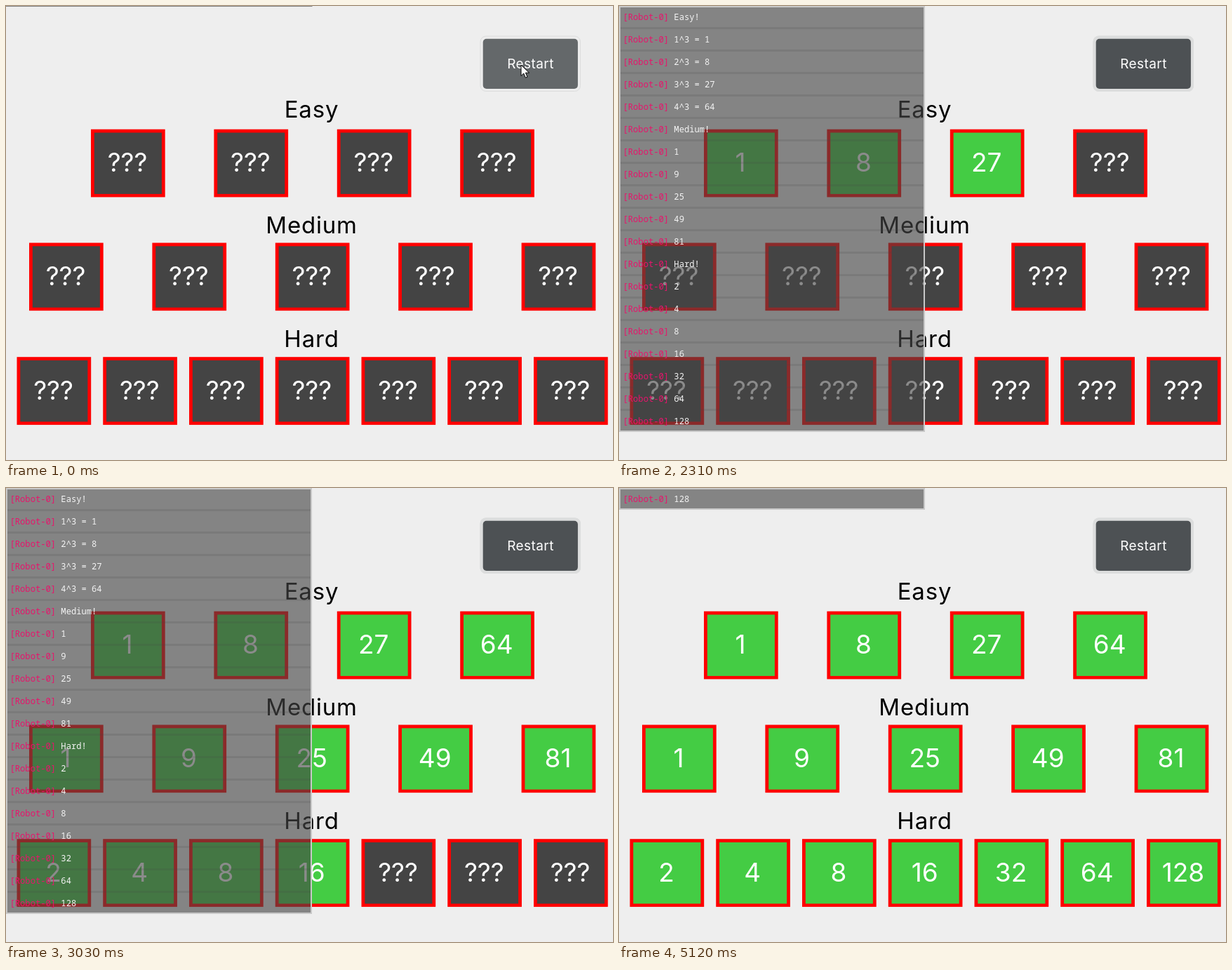
An HTML page that plays this animation: 865 px wide and 647 px high, repeating every 5150 ms.

```html
<!DOCTYPE html>
<html lang="en">
<head>
<meta charset="utf-8">
<title>Number sequences</title>
<style>
  html, body { margin: 0; width: 100%; height: 100%; overflow: hidden; background: #eee; }
  svg { display: block; width: 865px; height: 647px; }
  text { font-family: Inter, sans-serif; }
  .title { font-size: 33px; letter-spacing: .8px; text-anchor: middle; }
  .value { font-size: 37px; fill: #fff; text-anchor: middle; }
  .button { font-size: 19px; letter-spacing: .4px; fill: #fff; text-anchor: middle; }
  .log { font: 12.15px "Noto Sans Mono", monospace; fill: #f4f4f4; white-space: pre; }
  .name { fill: #e8146c; }
</style>
</head>
<body>
<svg id="stage" viewBox="0 0 865 647"></svg>
<script>
const LOOP = 5150, LOG_START = 2080, LOG_END = 5120;
const FILL_TIMES = [2080, 2140, 2230, 2320, 2410, 2510, 2540, 2610,
                    2700, 2780, 2860, 2950, 3030, 3130, 3200, 3300];
// Pointer position for each 30 ms step; it is gone afterwards.
const POINTER = [[734, 84], [757, 80], [787, 79], [817, 80]];

const LEVELS = [
  { name: 'Easy',   count: 4, x: 121,  y: 175.7, gap: 175.4, value: i => (i + 1) ** 3 },
  { name: 'Medium', count: 5, x: 33,   y: 337.5, gap: 175.4, value: i => (2 * i + 1) ** 2 },
  { name: 'Hard',   count: 7, x: 15.5, y: 500.2, gap: 122.75, value: i => 2 ** (i + 1) }
];
const TITLE_BASE = [159, 324, 486];

const stage = document.getElementById('stage');

function add(parent, tag, attrs, content) {
  const node = document.createElementNS('http://www.w3.org/2000/svg', tag);
  for (const key in attrs) node.setAttribute(key, attrs[key]);
  if (content !== undefined) node.textContent = content;
  parent.append(node);
  return node;
}

const rect = (parent, x, y, width, height, fill, more) =>
  add(parent, 'rect', { x, y, width, height, fill, ...more });

// Board
const cells = [], lines = [];
LEVELS.forEach((level, row) => {
  add(stage, 'text', { class: 'title', x: 435.5, y: TITLE_BASE[row] }, level.name);
  lines.push(level.name + '!');
  for (let i = 0; i < level.count; i++) {
    const x = level.x + i * level.gap, value = level.value(i);
    rect(stage, x, level.y, 105.7, 96.7, '#f00');
    const face = rect(stage, x + 4.8, level.y + 4.8, 96.1, 87.4, '#444');
    const label = add(stage, 'text', { class: 'value', x: x + 52, y: level.y + 60.3 });
    cells.push({ face, label, value });
    lines.push(row ? String(value) : `${i + 1}^3 = ${value}`);
  }
});

// Button
const ring = rect(stage, 675.5, 42.5, 143.5, 79.5, '#dcdddd', { rx: 8 });
rect(stage, 676, 43, 142.5, 78.5, 'none', { rx: 8, stroke: '#dcdddd' });
const button = rect(stage, 679.7, 46.8, 135.2, 71.2, '#4d5154', { rx: 5 });
add(stage, 'text', { class: 'button', x: 747.5, y: 89 }, 'Restart');

// Log panel
function makeLog(messages) {
  const log = add(stage, 'g', {}), height = messages.length * 32 - 1;
  rect(log, 0, 0, 436, height, '#444', { 'fill-opacity': .62 });
  rect(log, 1, 1, 434, height - 2, 'none', { stroke: '#c8c8c8', 'stroke-width': 2 });
  messages.forEach((message, i) => {
    if (i) rect(log, 2, i * 32 - 2, 432, 3, '#444', { 'fill-opacity': .15 });
    const text = add(log, 'text', { class: 'log', x: 5.5, y: i * 32 + 20 });
    add(text, 'tspan', { class: 'name' }, '[Robot-0]');
    add(text, 'tspan', {}, ' ' + message);
  });
  return log;
}

const emptyLog = rect(stage, 0, 0, 436.5, 1, '#858585');
const fullLog = makeLog(lines);
const lastLog = makeLog(lines.slice(-1));

const pointer = add(stage, 'path', {
  d: 'M0 0v15.5l3.7-3.5 2.7 6.2 2.6-1.1-2.6-5.9h5.2z',
  fill: '#fff', stroke: '#000', 'stroke-width': 1
});

const show = (node, on) => node.setAttribute('visibility', on ? 'visible' : 'hidden');
const mix = (a, b, k) => Math.round(a + (b - a) * k);

function draw(t) {
  const step = Math.min(4, Math.floor(t / 30)), k = step / 4;
  button.setAttribute('fill', `rgb(${mix(100, 77, k)},${mix(104, 81, k)},${mix(106, 84, k)})`);
  ring.setAttribute('fill-opacity', .06 + .94 * k);

  const spot = POINTER[step];
  show(pointer, spot);
  if (spot) pointer.setAttribute('transform', `translate(${spot})`);

  cells.forEach(({ face, label, value }, i) => {
    const solved = t >= FILL_TIMES[i];
    face.setAttribute('fill', solved ? '#4c4' : '#444');
    label.textContent = solved ? value : '???';
  });

  show(emptyLog, t < LOG_START);
  show(fullLog, t >= LOG_START && t < LOG_END);
  show(lastLog, t >= LOG_END);
}

const start = performance.now();
function tick() {
  draw((performance.now() - start) % LOOP);
  requestAnimationFrame(tick);
}
tick();
</script>
</body>
</html>
```
